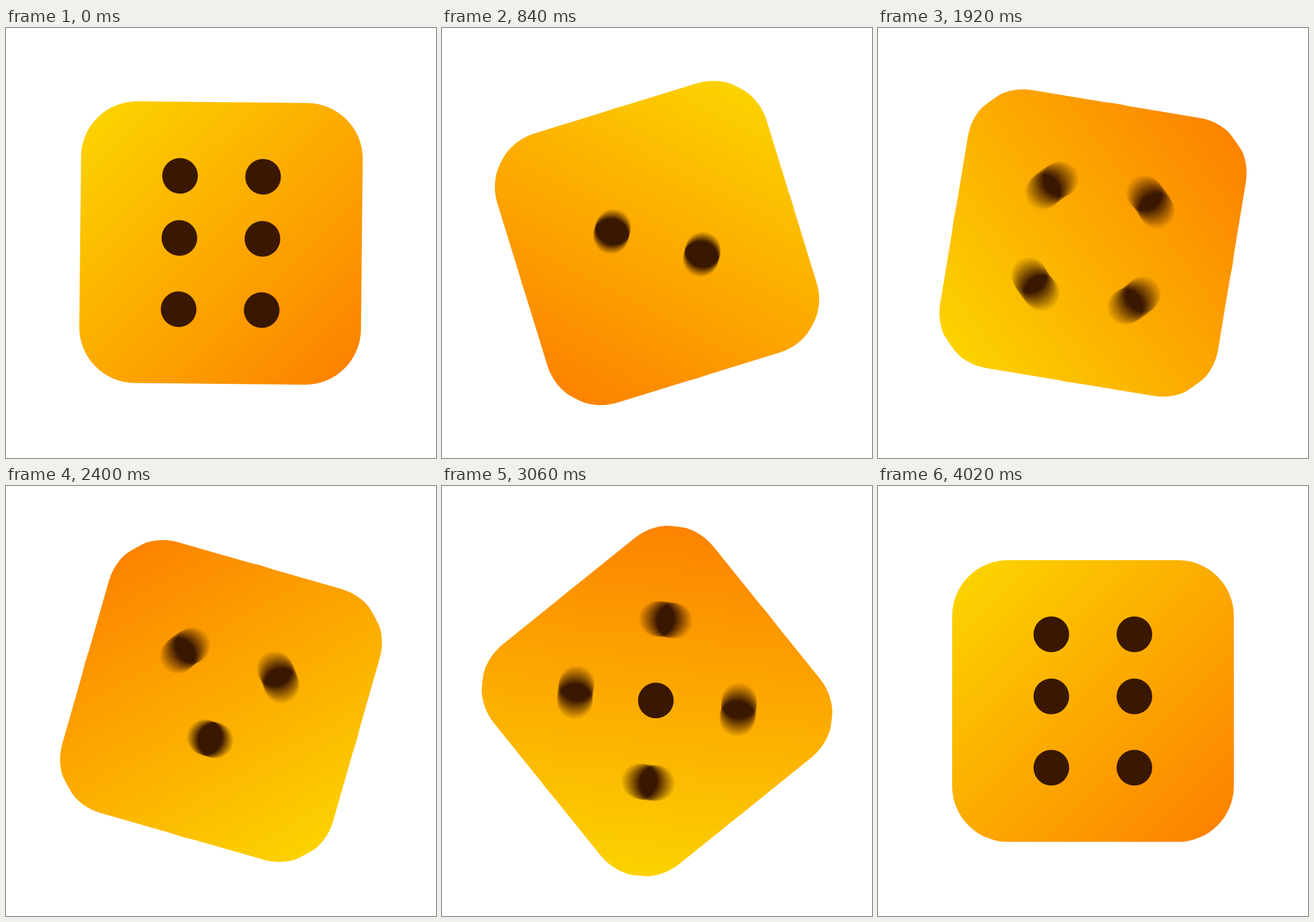
Recreate the animation shown at these times as an HTML page with a canvas. Size 748 px wide and 748 px high, loop 4440 ms.

```html
<!DOCTYPE html>
<html lang="en">
<head>
<meta charset="utf-8">
<title>Rolling die</title>
<style>
  html, body { margin: 0; width: 100%; height: 100%; overflow: hidden; background: #fff; }
  canvas { display: block; }
</style>
</head>
<body>
<canvas id="stage" width="748" height="748"></canvas>
<script>
const SIZE = 748, MID = SIZE / 2;
const LOOP = 4440, STEP = 60, LAST = 4020;
const ROLL = 4020, TURNS = 10, SHUTTER = 13.2, SAMPLES = 17;
const HALF = 245, CORNER = 97, PIP = 31;

const ctx = document.getElementById('stage').getContext('2d');
const pipLayer = document.createElement('canvas');
pipLayer.width = pipLayer.height = SIZE;
const pips = pipLayer.getContext('2d');

const square = d => [[-d, -d], [d, -d], [-d, d], [d, d]];
const six = [-116, -8, 116].flatMap(y => [[-72.5, y], [72, y]]);
const two = [[42, -69], [-42, 69]];
const three = [[0, -69], [-85, 68], [85, 68]];
const four = square(88);
const five = [...square(101), [2, -1]];
const faces = [six, two, four, three, five, six];

const fill = ctx.createLinearGradient(-HALF, -HALF, HALF, HALF);
fill.addColorStop(0, '#fcd700');
fill.addColorStop(1, '#fc7e00');

// Eased rotation in radians at a moment of the roll
function spin(ms) {
  const x = Math.min(Math.max(ms / ROLL, 0), 1);
  return x * x * (3 - 2 * x) * TURNS * 2 * Math.PI;
}

function circle(c, x, y, r) {
  c.beginPath();
  c.arc(x, y, r, 0, 2 * Math.PI);
}

// Fast spinning flattens the corners and slightly swells the edges
function drawBody(angle, sweep) {
  const d = (HALF - CORNER) * Math.SQRT2, a = sweep / 4;
  const reach = d * Math.cos(a) + Math.sqrt(CORNER ** 2 - (d * Math.sin(a)) ** 2);
  ctx.save();
  ctx.translate(MID, MID);
  ctx.rotate(angle);
  ctx.fillStyle = fill;
  circle(ctx, 0, 0, HALF / Math.cos(a));
  ctx.fill();
  circle(ctx, 0, 0, reach + 0.3);
  ctx.clip();
  ctx.beginPath();
  ctx.roundRect(-HALF, -HALF, 2 * HALF, 2 * HALF, CORNER);
  ctx.fill();
  ctx.restore();
}

// Motion blur: average the pips over the shutter time
function drawPips(ms, face) {
  pips.setTransform(1, 0, 0, 1, 0, 0);
  pips.globalCompositeOperation = 'source-over';
  pips.clearRect(0, 0, SIZE, SIZE);
  pips.globalCompositeOperation = 'lighter';
  pips.fillStyle = '#000';
  pips.globalAlpha = 1 / SAMPLES;
  for (let i = 0; i < SAMPLES; i++) {
    const angle = spin(ms + SHUTTER * (i / (SAMPLES - 1) - 0.5));
    pips.setTransform(1, 0, 0, 1, MID, MID);
    pips.rotate(angle);
    for (const [x, y] of face) {
      circle(pips, x, y, PIP);
      pips.fill();
    }
  }
  pips.setTransform(1, 0, 0, 1, 0, 0);
  pips.globalAlpha = 1;
  pips.globalCompositeOperation = 'source-in';
  pips.fillStyle = '#3a1700';
  pips.fillRect(0, 0, SIZE, SIZE);
  ctx.drawImage(pipLayer, 0, 0);
}

let shown = -1;

function draw(now) {
  const step = Math.min(Math.floor((now % LOOP) / STEP) * STEP, LAST);
  if (step !== shown) {
    shown = step;
    const ms = step + STEP / 2;
    const face = faces[Math.min(Math.floor(ms / ROLL * faces.length), faces.length - 1)];
    const sweep = spin(ms + SHUTTER / 2) - spin(ms - SHUTTER / 2);
    ctx.fillStyle = '#fff';
    ctx.fillRect(0, 0, SIZE, SIZE);
    drawBody(spin(ms), sweep);
    drawPips(ms, face);
  }
  requestAnimationFrame(tick);
}

function tick() {
  draw(performance.now() - start);
}

const start = performance.now();
tick();
</script>
</body>
</html>
```
